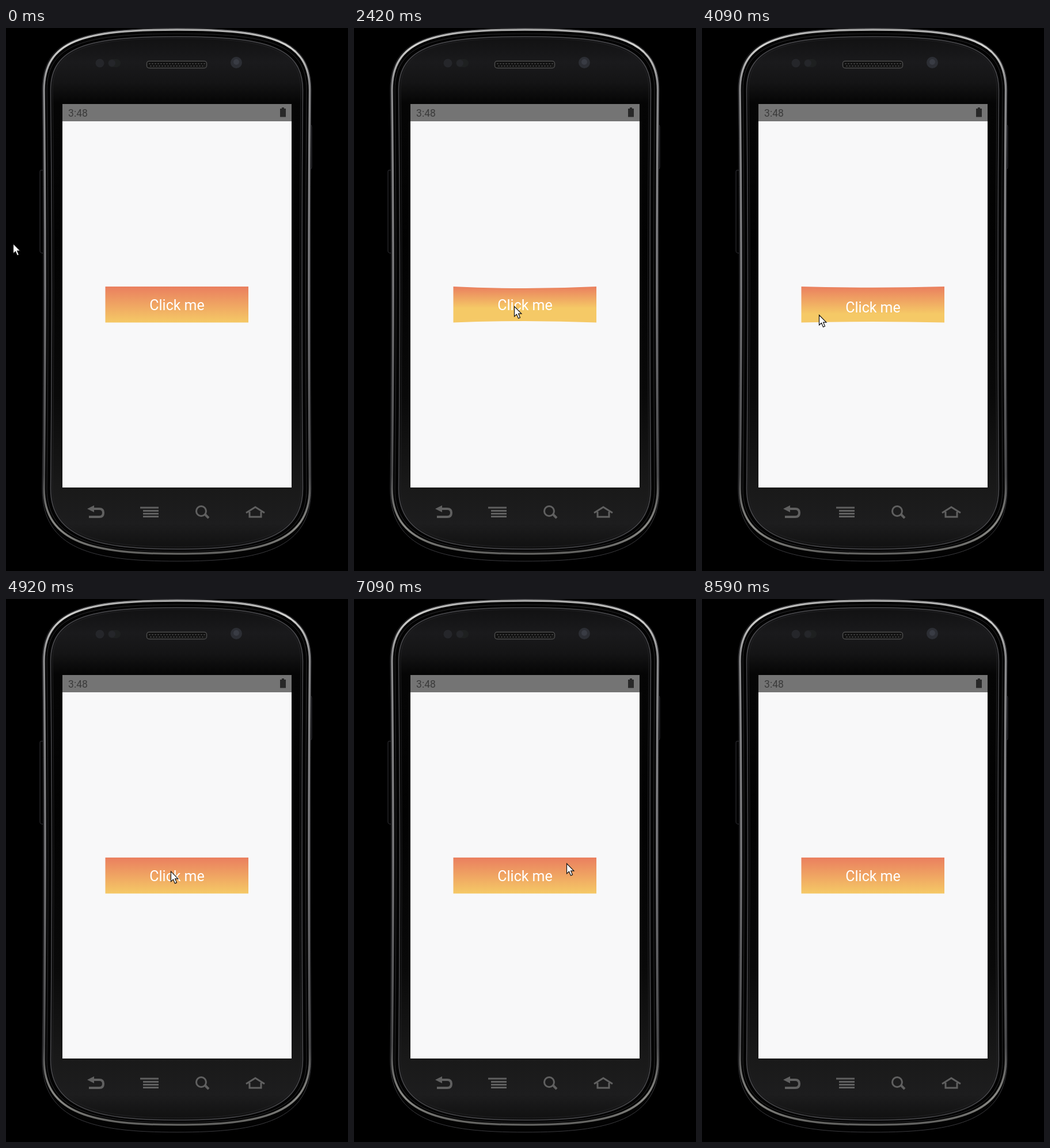
Animation, 594 px wide and 943 px high, one loop 8680 ms. Source, as an HTML page:

```html
<!DOCTYPE html>
<html lang="en">
<head>
<meta charset="utf-8">
<title>Jelly button</title>
<style>
html, body { margin: 0; width: 100%; height: 100%; overflow: hidden; background: #000; }
svg { display: block; width: 594px; height: 943px; }
text { font-family: Roboto, Arial, sans-serif; }
</style>
</head>
<body>
<svg viewBox="0 0 594 943" fill="none">
  <defs>
    <linearGradient id="body" x2="0" y2="1">
      <stop stop-color="#111112"/><stop offset=".05" stop-color="#1a1a1c"/>
      <stop offset=".09" stop-color="#141415"/><stop offset=".13" stop-color="#050505"/>
      <stop offset=".4" stop-color="#020202"/><stop offset=".7" stop-color="#090909"/>
      <stop offset=".88" stop-color="#191919"/><stop offset=".95" stop-color="#1d1d1e"/>
      <stop offset="1" stop-color="#101010"/>
    </linearGradient>
    <linearGradient id="rim" x2="0" y2="1">
      <stop stop-color="#aaa"/><stop offset=".03" stop-color="#d0d0ce"/>
      <stop offset=".1" stop-color="#8c8c8e"/><stop offset=".5" stop-color="#77777a"/>
      <stop offset=".85" stop-color="#4c4c4e"/><stop offset=".95" stop-color="#8a8a86"/>
      <stop offset="1" stop-color="#60605e"/>
    </linearGradient>
    <linearGradient id="fill" x2="0" y2="1">
      <stop stop-color="#ea7f5f"/><stop id="yellow" offset="1" stop-color="#f5c966"/>
    </linearGradient>
  </defs>

  <path stroke="#34343a" d="M64 247h-4q-1 0-1 3v137q0 4 5 4M529 168q2 0 2 4v69q0 4-2 4"/>
  <g id="shells"></g>

  <g fill="#25262a">
    <circle cx="163" cy="61" r="7.5"/>
    <rect x="177" y="54" width="22" height="14" rx="7" fill="#1e2020"/>
    <circle cx="184" cy="61" r="6"/>
    <circle cx="400" cy="60" r="10" fill="#2c2e34"/>
    <circle cx="400" cy="59" r="5" fill="#393c44"/>
  </g>
  <rect x="244.5" y="57.5" width="104" height="12" rx="4" fill="#101010" stroke="#4b4b4b" stroke-width="1.5"/>
  <path d="M248 62H346M250 66H346" stroke="#383838" stroke-width="2" stroke-dasharray="3 2"/>

  <g stroke="#606060" stroke-width="4">
    <path d="M149 835H162Q169 835 169 842Q169 849 162 849H144"/>
    <path d="M141 835L153 829V841Z" fill="#606060" stroke="none"/>
    <path stroke-width="2.8" d="M233 833H265M238 838.5H265M238 843.5H265M238 848.5H265"/>
    <circle cx="339" cy="839" r="8.5" stroke-width="3"/>
    <path d="M345 844L352 851"/>
    <path stroke-width="3" d="M417 842L433 832L449 842M423 840V849H443V840"/>
  </g>

  <path fill="#f8f8f9" d="M98 132H496V798H98Z"/>
  <path fill="#747474" d="M98 132H496V162H98Z"/>
  <text x="108" y="153.5" font-size="17.6" fill="#3b3b3b">3:48</text>
  <path fill="#282828" d="M479 138H483V140H486V154.5H476V140H479Z"/>

  <path id="button" fill="url(#fill)"/>
  <text id="label" x="297" text-anchor="middle" font-size="25" fill="#fff">Click me</text>
  <path id="cursor" fill="#fff" stroke="#111" stroke-width="1.2" d="M0 0V17.5L4 13.8L7 20.7L10 19.4L7.1 12.6H12.4Z"/>
</svg>
<script>
const LOOP = 8680, STEP = 83.5;
const $ = id => document.getElementById(id);
const clicks = [1450, 2250, 3670, 5250, 6200, 7600];

// Time followed by values
const pointer = [
  [0, 12, 374], [250, 290, 445], [420, 290, 445], [1000, 319, 458],
  [1400, 319, 458], [2150, 278, 483], [2700, 278, 483], [3500, 203, 498],
  [4300, 203, 498], [5150, 321, 462], [5900, 321, 462], [6200, 345, 461],
  [6800, 369, 459], [7900, 369, 459], [8500, 485, 366]
];
// Edge dent and label drop after a click
const jelly = [[0, 0, 0], [170, 1, 0], [420, .6, 4], [590, .3, 2], [750, 0, 0]];

// Phone outline with slightly pinched sides, from its four extremes
function shell(left, right, top, bottom, stroke, width = 1, fill = 'none') {
  const up = 108 - .82 * (108 - top), down = 800 + .84 * (bottom - 800);
  const d = `M${left} 108C${left} ${up} ${left + 67} ${top} 297 ${top}
    S${right} ${up} ${right} 108Q${right - 3} 440 ${right} 800
    C${right} ${down} ${right - 87} ${bottom} 297 ${bottom}
    S${left} ${down} ${left} 800Q${left + 4} 440 ${left} 108Z`;
  return `<path d="${d}" stroke="${stroke}" stroke-width="${width}" fill="${fill}"/>`;
}
$('shells').innerHTML =
  shell(63, 530, .5, 926, '#3a3a3e', 1, '#030303') +
  shell(66, 527.5, 3, 913, 'url(#rim)', 3.5) +
  shell(71, 522, 10, 909, '#29292b') +
  shell(77.5, 515.5, 15, 905, '#4a4a4e', 1.5, 'url(#body)') +
  shell(81, 512, 18, 901, '#202022');

function sample(keys, t) {
  const i = keys.findIndex(k => k[0] > t);
  if (i < 0) return keys.at(-1).slice(1);
  const a = keys[i - 1], b = keys[i];
  const u = (t - a[0]) / (b[0] - a[0]), e = u * u * (3 - 2 * u);
  return a.slice(1).map((v, j) => v + (b[j + 1] - v) * e);
}

function draw(now) {
  const time = now % LOOP;
  const t = Math.floor((time + 2) / STEP) * STEP;
  const click = clicks.findLast(c => c <= t) ?? -1000;
  const [dent, drop] = sample(jelly, t - click);
  const [x, y] = sample(pointer, t);

  $('button').setAttribute('d',
    `M172.5 449Q297 ${449 + 6 * dent} 421 449V511.5Q297 ${511.5 - 5 * dent} 172.5 511.5Z`);
  $('yellow').setAttribute('offset', 1 - .4 * dent);
  $('label').setAttribute('y', 490 + drop);
  $('cursor').setAttribute('transform', `translate(${x + .5} ${y + .5})`);
  $('cursor').style.display = time < 8500 ? '' : 'none';
}

const start = performance.now();
function tick() {
  draw(performance.now() - start);
  requestAnimationFrame(tick);
}
tick();
</script>
</body>
</html>
```
